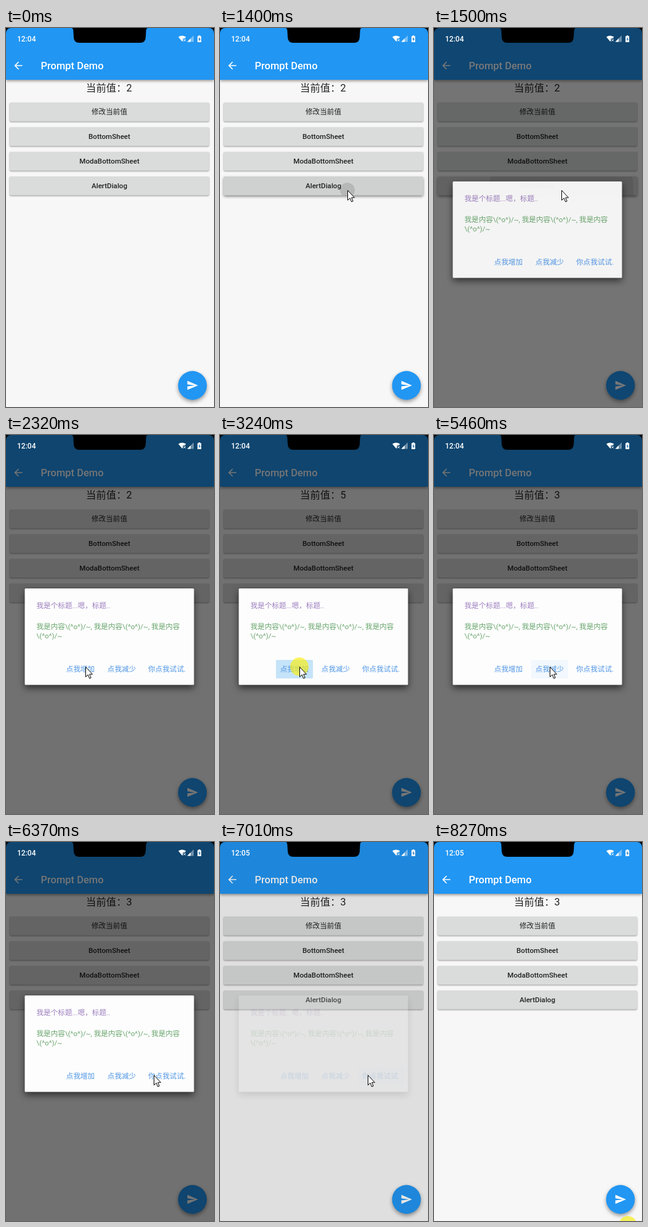
An HTML page for the animation above (8.5 s loop, 338 by 615 pixels).

```html
<!DOCTYPE html>
<html lang="zh-CN">
<head>
<meta charset="utf-8">
<style>
html, body { margin: 0; width: 100%; height: 100%; overflow: hidden; background: #f7f7f7; }
svg { display: block; width: 338px; height: 615px; }
text { font: 11.6px Roboto, "Noto Sans CJK SC", "Noto Sans CJK", sans-serif; white-space: pre; }
.mid { text-anchor: middle; }
.medium { font-weight: 500; }
.raised { filter: drop-shadow(0 1.2px 1.2px #0006); }
</style>
</head>
<body>
<svg viewBox="0 0 338 615">
  <defs>
    <clipPath id="lastButton"><rect x="6" y="241" width="324" height="30.5" rx="2"/></clipPath>
  </defs>
  <rect width="338" height="615" fill="#f7f7f7"/>
  <rect width="338" height="84" fill="#2196f3" style="filter:drop-shadow(0 2px 2px #0006)"/>
  <path fill="#fff" transform="translate(10.1 51.1) scale(.822)" d="M20 11H7.83l5.59-5.59L12 4l-8 8 8 8 1.41-1.41L7.83 13H20z"/>
  <text class="medium" x="56.5" y="67" fill="#fff" style="font-size:16.5px">Prompt Demo</text>
  <text id="value" x="130" y="103" fill="#222" style="font-size:16.4px"></text>

  <g id="buttons"></g>
  <g clip-path="url(#lastButton)">
    <rect id="press" x="6" y="241" width="324" height="31" fill="#000"/>
    <circle id="ripple" cx="207" cy="263" fill="#000"/>
  </g>
  <g id="labels" class="mid" fill="#222"></g>

  <circle cx="303" cy="580" r="23.4" fill="#2196f3" style="filter:drop-shadow(0 3px 3px #0006)"/>
  <path fill="#fff" transform="translate(293.1 570.1) scale(.822)" d="M2.01 21L23 12 2.01 3 2 10l15 2-15 2z"/>

  <rect id="barrier" width="338" height="615" fill="#000"/>

  <g id="dialog">
    <rect x="30.5" y="249" width="275" height="156.5" rx="1.5" fill="#fdfdfd" style="filter:drop-shadow(0 5px 6px #0009)"/>
    <g id="inks" fill="#c5e3f9"></g>
    <text x="49.5" y="281" fill="#9c7fbf">我是个标题...嗯，标题..</text>
    <g fill="#68a56c">
      <text x="49.5" y="315">我是内容\(^o^)/~, 我是内容\(^o^)/~, 我是内容</text>
      <text x="49.5" y="330">\(^o^)/~</text>
    </g>
    <g fill="#4f96e6">
      <text x="97.8" y="384">点我增加</text>
      <text x="164.8" y="384">点我减少</text>
      <text x="231" y="384">你点我试试.</text>
    </g>
  </g>

  <path d="M0 0H9Q0 0 0 9zM338 0H329Q338 0 338 9zM107 0Q109.500 1 109.500 6L110 15Q110.500 24 119 24H218Q226.500 24 227 15L227.500 6Q227.500 1 230 0z"/>
  <text id="clock" class="medium" x="18" y="22" fill="#fff" style="font-size:12px"></text>
  <g fill="#fff">
    <path d="M280 14.500Q286 10.500 292.500 14.500L290.500 17H287.500V20.500L286.400 22z"/>
    <path d="M288.500 18l3.500 3.500m0-3.500l-3.500 3.500" stroke="#fff"/>
    <path d="M305 12V22.500H294.500z" opacity=".4"/>
    <path d="M300 17V22.500H294.500z"/>
    <path d="M313 12h2.500v1.300h1.700v9.700h-6v-9.700h1.800z"/>
    <path d="M314.800 14.800l-2.300 3.800h1.500v3l2.300-3.900h-1.500z" fill="#2176b8"/>
  </g>

  <g id="pointer">
    <circle id="halo" r="15" fill="#f6ee1c" opacity=".7"/>
    <path id="arrow" d="M.5 .5V16.500L4.200 13 6.700 19 9.200 18 6.700 12.200H11.500z" fill="#fff" stroke="#000" stroke-linejoin="round"/>
  </g>
</svg>
<script>
const $ = id => document.getElementById(id);
const LOOP = 8500;

$('buttons').innerHTML = [0, 1, 2, 3].map(i =>
  `<rect class="raised" x="6" y="${121 + i * 40}" width="324" height="30.500" rx="2" fill="#dadbdb"/>`).join('');
$('labels').innerHTML = ['修改当前值', 'BottomSheet', 'ModaBottomSheet', 'AlertDialog'].map((s, i) =>
  `<text x="168" y="${140 + i * 40}" class="${i ? 'medium' : ''}">${s}</text>`).join('');
$('inks').innerHTML = [[91, 60], [158, 60], [224, 76]].map(([x, w]) =>
  `<rect x="${x}" y="365" width="${w}" height="30" rx="1.500"/>`).join('');
const inks = $('inks').children;

// start, end, target x, target y
const moves = [
  [80, 840, 207, 263],
  [1910, 2320, 129, 376],
  [3740, 4140, 188, 376],
  [5790, 6370, 240, 378],
  [7430, 7970, 315, 622]
];
const series = (start, n) => Array.from({length: n}, (_, i) => start + i * 210);
const plus = series(2600, 5), minus = series(4410, 4);
const LAG = 180;   // from pressing to the value changing
const clicks = [[1070, 1270], [6600, 6710], [8270, LOOP],
  ...[...plus, ...minus].map(t => [t, t + 110])];

const ramp = (t, a, b) => Math.min(1, Math.max(0, (t - a) / (b - a)));
const smooth = p => p * p * (3 - 2 * p);
const pulse = (t, a, b, c, d) => ramp(t, a, b) * (1 - ramp(t, c, d));
const set = (el, name, v) => el.setAttribute(name, v);

function pointerAt(t) {
  if (t < 80) return [315, 622];
  let x = 285, y = 458;
  for (const [a, b, tx, ty] of moves) {
    const p = smooth(ramp(t, a, b));
    x += (tx - x) * p;
    y += (ty - y) * p;
  }
  return [x, y];
}

function draw(t) {
  const done = list => list.filter(s => t >= s + LAG).length;
  $('value').textContent = '当前值：' + (2 + done(plus) - done(minus));
  $('clock').textContent = t < 6900 ? '12:04' : '12:05';

  set($('press'), 'opacity', .05 * pulse(t, 1270, 1390, 1500, 1550));
  set($('ripple'), 'r', Math.max(0, (t - 1389.5) * 1.05));
  set($('ripple'), 'opacity', .12 * (1 - ramp(t, 1480, 1550)));
  $('buttons').lastChild.style.filter = t >= 1340 && t < 1550 ? 'drop-shadow(0 2px 2px #0007)' : '';

  const open = 1 - (1 - ramp(t, 1410, 1515)) ** 2;
  const shown = open * (1 - smooth(ramp(t, 6880, 7060)));
  set($('barrier'), 'opacity', .54 * shown);
  set($('dialog'), 'opacity', shown * (t < 1550 ? .96 : 1));

  set(inks[0], 'opacity', pulse(t, 2720, 2970, 3560, 3730));
  set(inks[1], 'opacity', pulse(t, 4560, 4810, 5280, 5510));
  set(inks[2], 'opacity', .6 * pulse(t, 6730, 6850, 6900, 7060));

  const [x, y] = pointerAt(t);
  set($('pointer'), 'transform', `translate(${x.toFixed(1)} ${y.toFixed(1)})`);
  $('halo').style.display = clicks.some(([a, b]) => t >= a && t < b) ? '' : 'none';
}

const begin = performance.now();
function frame() {
  draw((performance.now() - begin) % LOOP);
  requestAnimationFrame(frame);
}
frame();
</script>
</body>
</html>
```
